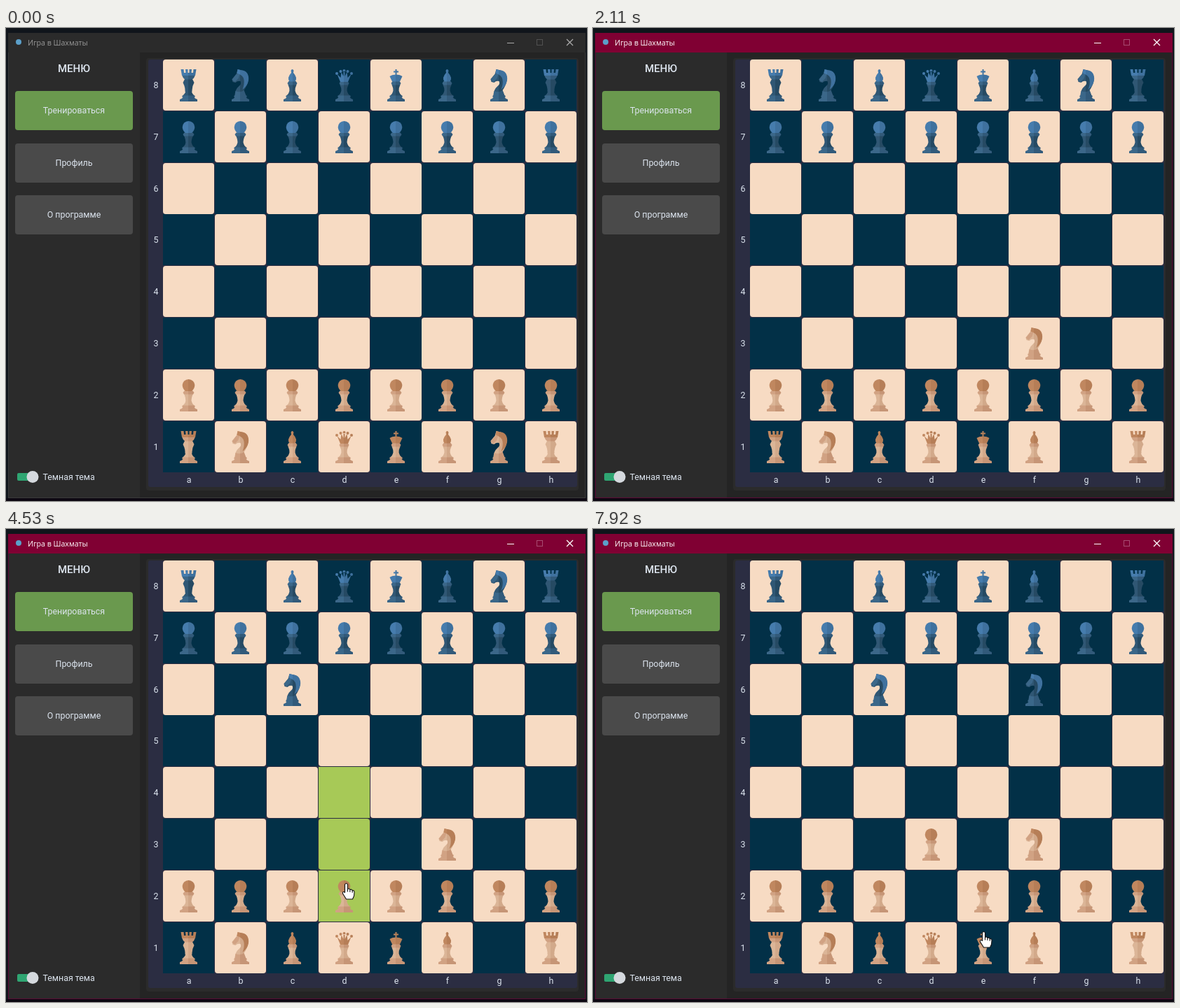
Recreate the animation shown at these times as an HTML page. Size 829 px wide and 676 px high, loop 8000 ms.

```html
<!DOCTYPE html>
<html lang="ru">
<head>
<meta charset="utf-8">
<title>Игра в Шахматы</title>
<style>
html, body { margin: 0; width: 100%; height: 100%; overflow: hidden; background: #10151b; }
svg { display: block; }
text { font: 12.4px Roboto, sans-serif; fill: #dce4ee; }
.mid { text-anchor: middle; }
#caption { font: 10.6px "Open Sans", "Noto Sans", sans-serif; }
</style>
</head>
<body>
<svg id="stage" width="829" height="676" viewBox="0 0 829 676">
  <defs id="defs"></defs>
  <rect width="829" height="676" fill="#10151b"/>
  <rect y="672" width="829" height="4" fill="#0d0812"/>
  <rect id="frame" x="3.5" y="7.5" width="823" height="664" fill="#242424"/>
  <rect x="4" y="35" width="187" height="636" fill="#2b2b2b"/>
  <rect id="bar" x="3" y="7" width="824" height="28"/>
  <circle cx="18" cy="20" r="4" fill="#5b9fc9"/>
  <text id="caption" x="31" y="25">Игра в Шахматы</text>
  <g id="controls" fill="none">
    <path d="M715 21.5h10"/>
    <path d="M800 16l9 9M809 16l-9 9" stroke-width="1.3"/>
    <rect x="757.5" y="16.5" width="8" height="8" opacity=".3"/>
  </g>
  <text class="mid" x="97" y="63" style="font-size:15px;font-weight:500">МЕНЮ</text>
  <g id="menu"></g>
  <rect x="16" y="636" width="26" height="11" rx="2" fill="#2fa572"/>
  <circle cx="38" cy="641.5" r="8.5" fill="#d5d9de"/>
  <text x="52.5" y="645.5">Темная тема</text>
  <rect x="200" y="43" width="617" height="618" rx="4" fill="#2b2b2b"/>
  <rect x="203" y="45" width="612" height="611" rx="3" fill="#2b2d42"/>
  <g id="board"></g>
  <g id="pieces"></g>
  <g id="cursor" stroke="#111" stroke-width="1.1" stroke-linejoin="round" fill="#fff">
    <circle id="ring" cx="-.5" cy="-.5" r="11" fill="#d0de28" stroke="none"/>
    <path id="arrow" transform="translate(0 .5)" d="M0 0V16L3.7 12.6 6.5 19 9 18 6.2 11.9H11Z"/>
    <g id="hand" transform="translate(-.5 .5)">
      <path d="M-2 1.5Q0-1.5 2 1.5V8Q4.5 6.5 5.3 9 8 7.8 8.7 10.3 11.5 9.3 11.5 13L11 18 9 22.5H0L-5 14.5Q-5.5 10.5-2 13Z"/>
      <path d="M2 8v4M5.3 9v3.5M8.7 10.3v3" fill="none"/>
    </g>
  </g>
</svg>
<script>
const LOOP = 8000, LIME = '#a7c957', OLIVE = '#8aa836';
const $ = id => document.getElementById(id);
const add = (parent, markup) => {
  parent.insertAdjacentHTML('beforeend', markup);
  return parent.lastElementChild;
};
const show = (el, on) => el.setAttribute('visibility', on ? 'visible' : 'hidden');

// Light and shaded halves for the head, body and base of each side.
const TONES = {
  b: ['#467cad,#3f719e', '#305774,#264a63', '#3b6789,#325a7a'],
  w: ['#c0875f,#b67e57', '#dbb597,#d2a98a', '#d1a283,#c69576']
};
const BASE = [
  [1, 'M-4 31H4Q5 35 8.5 38H-8.5Q-5 35-4 31Z'],
  [2, 'M-9 37.5H9V40H-9ZM-8 40H8Q9 42 12.5 43V46H-12.5V43Q-9 42-8 40Z']
];
const STEM = [1, 'M-6 22H6Q3.500 27 4 32H-4Q-3.500 27-6 22Z'];
const COLLAR = [2, 'M-5 17H5L7 20 5.500 22.500H-5.500L-7 20Z'];
const SHAPES = {
  p: [[1, 'M-7 20H7Q4 25 4 32H-4Q-4 25-7 20Z'], [2, 'M-6 16.500H6L8 19 6.500 21.500H-6.500L-8 19Z'],
    [0, 'M-8.800 8.800A8.800 8.800 0 0 1 8.800 8.800Q8.500 14 4.500 17H-4.500Q-8.500 14-8.800 8.800Z']],
  r: [[1, 'M-5 13H5L8 19Q4.500 25 5 32H-5Q-4.500 25-8 19Z'], [2, 'M-9.500 8H9.500Q8 13 5 14.500H-5Q-8 13-9.500 8Z'],
    [0, 'M-11 0H-7L-6.500 5H-4L-4.500 0H-1V5H1V0H4.500L4 5H6.500L7 0H11L9.500 9H-9.500Z']],
  b: [STEM, COLLAR, [0, 'M-1.700 3.200A2 2 0 1 1 1.700 3.200L1.500 5Q8 12 4 17.500H-4Q-8 12-1.500 5Z']],
  q: [STEM, COLLAR, [0, 'M-5.500 18L-10 7-5 12-4 4-1 10-1 3H1L1 10 4 4 5 12 10 7 5.500 18Z' +
    [[-10.5, 6], [-5, 3], [0, 2], [5, 3], [10.5, 6]].map(([x, y]) => `M${x - 2} ${y}a2 2 0 1 0 4 0a2 2 0 1 0-4 0Z`).join('')]],
  k: [STEM, COLLAR, [0, 'M-1 0H1V2.500H3.500V4.500H1V8H-1V4.500H-3.500V2.500H-1ZM-5.500 17.500L-9 10Q-4 7 0 8 4 7 9 10L5.500 17.500Z']],
  n: [[1, 'M-4 0L0 1Q12 3 11 16 10 23 5 30L8 38H-8Q-8 29-2 24 2 21 0 17-4 16-7 19L-11 18-12 14-6 7Z'],
    [0, 'M-4 0L0 1Q13 2 11.500 16 10 24 3 29 6 21 5 15 4 8-5 6Z'],
    [2, 'M-6 7L-1 7-3 13-8 18-12 15ZM-7 31Q0 34 5 30L8 38H-8Z']]
};
for (const side in TONES) {
  TONES[side].forEach((pair, i) => {
    const [light, dark] = pair.split(',');
    add($('defs'), `<linearGradient id="${side}${i}" gradientUnits="userSpaceOnUse" x1="-13" x2="13">
      <stop offset=".5" stop-color="${light}"/><stop offset=".5" stop-color="${dark}"/></linearGradient>`);
  });
  for (const kind in SHAPES) {
    const parts = BASE.concat(SHAPES[kind])
      .map(([tone, d]) => `<path fill="url(#${side}${tone})" d="${d}"/>`).join('');
    add($('defs'), `<g id="${side}${kind}">${parts}</g>`);
  }
}

['Тренироваться', 'Профиль', 'О программе'].forEach((label, i) => {
  const y = 90 + i * 74.7;
  add($('menu'), `<rect x="13" y="${Math.round(y)}" width="168" height="56" rx="4" fill="${i ? '#4a4a4a' : '#6a994e'}"/>`);
  add($('menu'), `<text class="mid" x="97" y="${Math.round(y + 32)}">${label}</text>`);
});

const STEP_X = 73.88, STEP_Y = 73.8;
const colX = c => Math.round(224 + STEP_X * c);
const rowY = r => Math.round(45 + STEP_Y * r);
const spot = sq => ['abcdefgh'.indexOf(sq[0]), 8 - sq[1]];
const squares = {}, pieces = {};

function place(el, sq) {
  const [c, r] = spot(sq);
  el.setAttribute('transform', `translate(${colX(c) + 36.5} ${rowY(r) + 14})`);
}

for (let r = 0; r < 8; r++) {
  add($('board'), `<text class="mid" x="214" y="${rowY(r) + 40.5}">${8 - r}</text>`);
  add($('board'), `<text class="mid" x="${colX(r) + 37}" y="650">${'abcdefgh'[r]}</text>`);
  for (let c = 0; c < 8; c++) {
    const sq = 'abcdefgh'[c] + (8 - r), dark = (r + c) % 2;
    const el = add($('board'), `<rect x="${colX(c)}" y="${rowY(r)}" width="73" height="73" rx="${dark ? 0 : 4}"/>`);
    squares[sq] = { el, dark };
    if (r < 2 || r > 5) {
      const side = r < 2 ? 'b' : 'w';
      const kind = r % 7 ? 'p' : 'rnbqkbnr'[c];
      const use = add($('pieces'), `<use href="#${side}${kind}"/>`);
      pieces[sq] = { el: use, side };
      place(use, sq);
    }
  }
}

// from, to, time lifted, time set down
const MOVES = [
  ['g1', 'f3', 1170, 1230], ['b8', 'c6', 2640, 2970],
  ['d2', 'd3', 5210, 5240], ['g8', 'f6', 7520, 7850]
];
// chosen square, its targets, start, end
const CHOICES = [['g1', ['f3', 'h3'], 550, 1170], ['d2', ['d3', 'd4'], 4300, 5210]];
const CLICKS = [550, 1050, 4300, 5120];
const PATH = [
  [130, 800, 676], [400, 706, 598], [550, 706, 598], [1040, 636, 446], [1200, 636, 446],
  [1350, 639, 444], [1610, 639, 444], [2110, 829, 664], [3280, 612, 674], [3520, 527, 562],
  [4080, 486, 530], [4140, 486, 529], [4300, 486, 529], [4530, 486, 506], [4990, 487, 445],
  [5120, 487, 445], [5650, 487, 442], [5870, 508, 447], [6070, 508, 447], [6710, 558, 570],
  [7850, 558, 570], [7920, 558, 575], [LOOP, 558, 575]
];

function pointer(t) {
  if (t < 130 || (t >= 2110 && t < 3280)) return null;
  const i = PATH.findIndex(key => key[0] > t);
  const [t0, x0, y0] = PATH[i - 1], [t1, x1, y1] = PATH[i];
  const k = (t - t0) / (t1 - t0);
  return [x0 + (x1 - x0) * k, y0 + (y1 - y0) * k];
}

function squareAt([x, y]) {
  const c = Math.floor((x - 224) / STEP_X), r = Math.floor((y + 1 - 45) / STEP_Y);
  return c >= 0 && c < 8 && r >= 0 && r < 8 ? 'abcdefgh'[c] + (8 - r) : '';
}

function draw(t) {
  const active = t >= 550;
  $('frame').setAttribute('stroke', active ? '#5c0a36' : '#3a3a3a');
  $('bar').setAttribute('fill', active ? '#800033' : '#2b2b2b');
  $('caption').style.fill = active ? '#fff' : '#999';
  $('controls').setAttribute('stroke', active ? '#fff' : '#aaa');

  const white = new Set(Object.keys(pieces).filter(sq => pieces[sq].side === 'w'));
  for (const [from, to, lifted, set] of MOVES) {
    const { el, side } = pieces[from];
    place(el, t < set ? from : to);
    show(el, t < lifted || t >= set);
    if (side === 'w' && t >= lifted) {
      white.delete(from);
      white.add(to);
    }
  }

  const [chosen, targets] = CHOICES.find(c => t >= c[2] && t < c[3]) || ['', []];
  const pos = pointer(t);
  const live = t < 1170 || (t >= 3280 && t < 5800);
  const under = pos && live ? squareAt(pos) : '';
  const hover = white.has(under) || targets.includes(under) ? under : '';
  for (const sq in squares) {
    const { el, dark } = squares[sq];
    const tint = sq === hover || targets.includes(sq) ? LIME : sq === chosen ? OLIVE : '';
    el.setAttribute('fill', tint || (dark ? '#023047' : '#f7dbc3'));
  }

  show($('cursor'), pos);
  if (!pos) return ['ring', 'arrow', 'hand'].forEach(id => show($(id), false));
  $('cursor').setAttribute('transform', `translate(${pos.map(Math.round)})`);
  const hand = t > 4000 || (hover && !(t > 950 && t < 2110));
  show($('hand'), hand);
  show($('arrow'), !hand);
  show($('ring'), CLICKS.some(c => t >= c && t < c + 150));
}

function tick() {
  draw(performance.now() % LOOP);
  requestAnimationFrame(tick);
}
tick();
</script>
</body>
</html>
```
